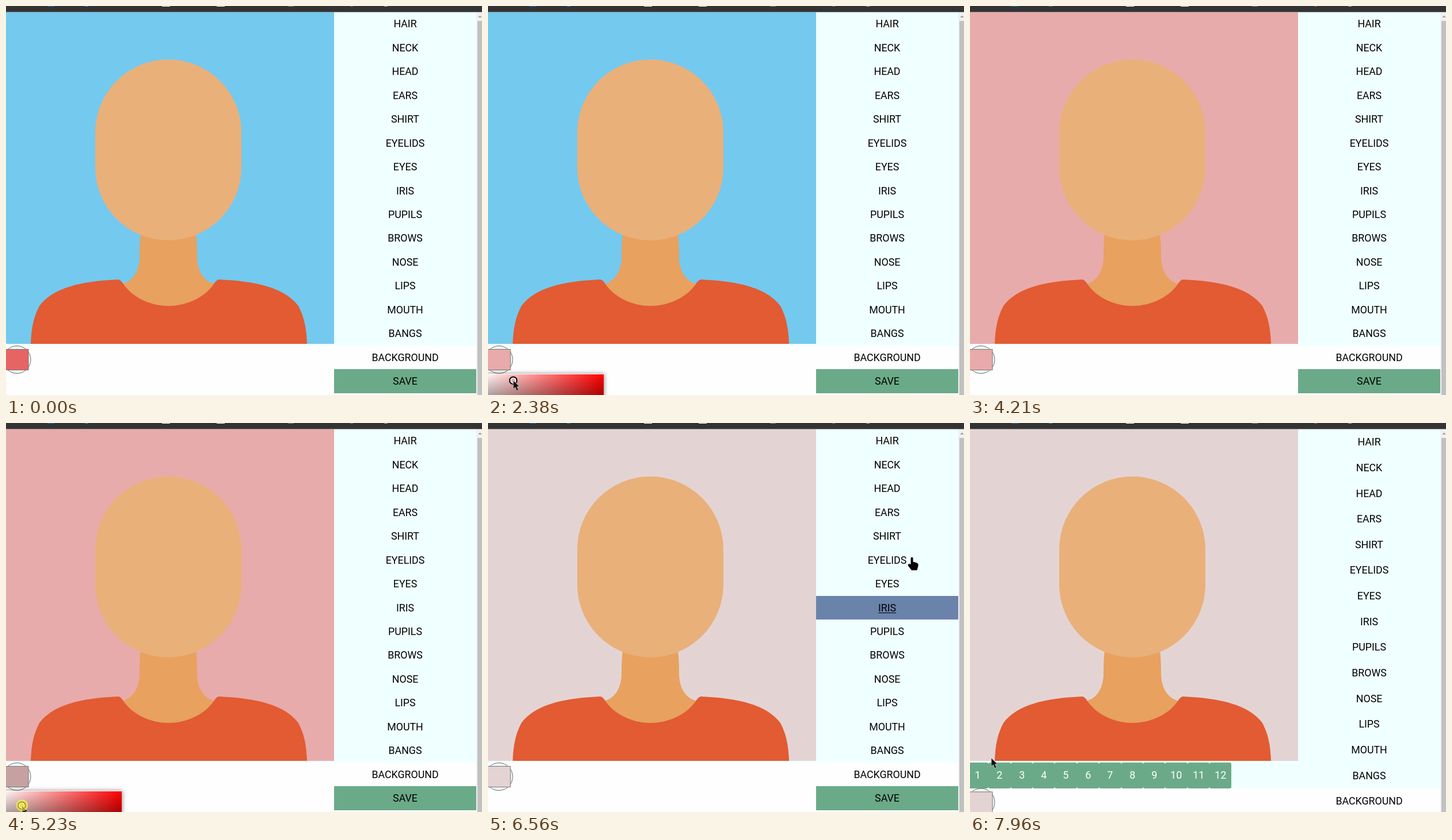
An HTML page with a canvas for the animation above (7990 ms loop, 827 px wide and 677 px high).

```html
<!DOCTYPE html>
<html lang="en">
<head>
<meta charset="utf-8">
<title>Avatar editor</title>
<style>
  html, body { margin: 0; width: 100%; height: 100%; overflow: hidden; background: #fefefe; }
  canvas { display: block; }
</style>
</head>
<body>
<canvas id="stage" width="827" height="677"></canvas>
<script>
const ctx = document.getElementById('stage').getContext('2d');
const LOOP = 7990;
const MENU = ['HAIR', 'NECK', 'HEAD', 'EARS', 'SHIRT', 'EYELIDS', 'EYES', 'IRIS', 'PUPILS',
  'BROWS', 'NOSE', 'LIPS', 'MOUTH', 'BANGS', 'BACKGROUND', 'SAVE'];
const GREEN = '#6baa88', AZURE = '#f0ffff';
const PANEL = { left: 570, right: 817, top: 10.7, step: 41.45 };
const PICKER = { left: -13, top: 642, width: 214, height: 108 };

// Places the pointer visits
const tone = (saturation, value) =>
  [PICKER.left + saturation * PICKER.width, PICKER.top + (1 - value) * PICKER.height];
const item = name => [750, PANEL.top + (MENU.indexOf(name) + .5) * PANEL.step];
const RED = tone(.565, .9), PINK = tone(.266, .91), DUSTY = tone(.19, .78), PALE = tone(.07, .89);
const SWATCH = [20, 623], BLANK = [301, 620], BELOW = [311, 640];
const OFF_BOTTOM = [400, 720], OFF_LEFT = [-30, 530], SHOULDER = [37, 583];

const MOVES = [
  { from: 100, to: 270, goal: SWATCH },
  { from: 1170, to: 1900, goal: RED },
  { from: 2050, to: 2300, goal: PINK, picks: true },
  { from: 2620, to: 2860, goal: BLANK },
  { from: 3460, to: 3880, goal: item('SHIRT') },
  { from: 3880, to: 4210, goal: OFF_LEFT },
  { from: 4300, to: 4460, goal: SWATCH },
  { from: 4880, to: 5100, goal: PINK },
  { from: 5150, to: 5230, goal: DUSTY, picks: true },
  { from: 5230, to: 5400, goal: PALE, picks: true },
  { from: 5560, to: 5780, goal: BELOW },
  { from: 6150, to: 6640, goal: item('EARS') },
  { from: 6840, to: 6960, goal: item('HAIR') },
  { from: 7540, to: 7960, goal: SHOULDER }
];
const PICKS = MOVES.filter(move => move.picks);

// Clicks open and close the picker in turn; the last one opens the hair tools.
const CLICKS = [430, 2880, 4540, 5820, 7030];
const CLICK_TIME = 130, PICKER_DELAY = 250, TOOLS_DELAY = 100, HOVER_LAG = 70;
const BACKGROUNDS = ['#74c9ef', '#e8abab', '#e3d4d3'];

// Sideways motion eases out while vertical motion stays even, which bends each path.
function follow(moves, start, t) {
  let [x, y] = start;
  for (const { from, to, goal } of moves) {
    if (t < from) break;
    const k = Math.min(1, (t - from) / (to - from));
    x += (goal[0] - x) * Math.sin(k * Math.PI / 2);
    y += (goal[1] - y) * k;
  }
  return [x, y];
}

function box(x, y, w, h, color) {
  ctx.fillStyle = color;
  ctx.fillRect(x, y, w, h);
}

function rounded(x, y, w, h, r, color) {
  ctx.beginPath();
  ctx.roundRect(x, y, w, h, r);
  ctx.fillStyle = color;
  ctx.fill();
}

function shape(d, fill, stroke, x = 0, y = 0) {
  const path = new Path2D(d);
  ctx.save();
  ctx.translate(x, y);
  ctx.fillStyle = fill;
  ctx.fill(path);
  if (stroke) {
    ctx.strokeStyle = stroke;
    ctx.lineWidth = 1;
    ctx.stroke(path);
  }
  ctx.restore();
}

function disc(x, y, r, fill, stroke, width = 1) {
  ctx.beginPath();
  ctx.arc(x, y, r, 0, Math.PI * 2);
  ctx.fillStyle = fill;
  ctx.fill();
  if (stroke) {
    ctx.strokeStyle = stroke;
    ctx.lineWidth = width;
    ctx.stroke();
  }
}

function label(text, x, middle, size, color) {
  ctx.font = `${size}px Roboto, sans-serif`;
  ctx.textAlign = 'center';
  ctx.fillStyle = color;
  ctx.fillText(text, x, Math.round(middle + size * .333));
}

function drawPortrait(background) {
  box(0, 11, PANEL.left, 577, background);
  shape('M234 395C232 415 232 425 232 440C230 468 216 480 202 484L225 530H340L363 484' +
    'C348 480 334 468 332 440C332 425 332 415 330 395Z', '#e8a15f');
  rounded(155, 93, 254, 315, 127, '#eab07a');
  shape('M43 588C44 560 48 541 58 522C82 490 130 479 195 476Q199 476 204 484' +
    'C222 510 255 522 282 522C310 522 343 510 361 484Q366 476 370 476' +
    'C435 479 484 490 508 522C518 541 522 560 523 588Z', '#e25b32');
}

function drawBrowser() {
  box(0, 0, 827, 10.6, '#333');
  box(72, 0, 12, 1, '#1279b8');
  box(137, 0, 6, 1, '#1c8fd6');
  box(271, 0, 14, 1, '#fff');
  box(366, 0, 14, 1, '#fff');
  box(490, 0, 10, 1, '#888');
  box(598, 0, 5, 1, '#d0593a');
  box(657, 0, 6, 1, '#aaa');
  box(PANEL.right, 11, 10, 666, '#f1f1f1');
  box(819, 26, 8, 651, '#c1c1c1');
  shape('M820 20L823.5 16.5L827 20Z', '#a3a3a3');
}

function drawMenu(hovered, top, step) {
  const width = PANEL.right - PANEL.left, center = PANEL.left + width / 2;
  MENU.forEach((name, i) => {
    const y = Math.round(top + i * step), height = Math.round(top + (i + 1) * step) - y;
    const middle = top + (i + .5) * step;
    if (name === 'SAVE') box(PANEL.left, y, width, height, GREEN);
    if (i === hovered) box(PANEL.left, y, width, height, '#6a83ab');
    label(name, center, middle, 17.8, '#000');
    if (i === hovered) {
      const line = ctx.measureText(name).width;
      box(center - line / 2, Math.round(middle + 8), line, 1, '#000');
    }
  });
}

function drawTools() {
  const edge = i => Math.round(-6.3 + i * 38.4);
  for (let i = 0; i < 12; i++) {
    rounded(edge(i), 591, edge(i + 1) - edge(i), 45, 3, GREEN);
    label(i + 1, edge(i) + 19.2, 613.5, 18, '#fff');
  }
}

function drawSwatch(color, shift) {
  disc(19, 615.5 + shift, 24, '#f1f6f6', '#6b6b6b');
  box(-5, 597 + shift, 44, 37, color);
  ctx.strokeStyle = '#777';
  ctx.strokeRect(-5.5, 597.5 + shift, 44.5, 36);
}

function drawPicker([x, y], color) {
  const { left, top, width, height } = PICKER;
  const fade = (x1, y1, from, to) => {
    const gradient = ctx.createLinearGradient(left, top, x1, y1);
    gradient.addColorStop(0, from);
    gradient.addColorStop(1, to);
    box(left, 641, width, height, gradient);
  };
  ctx.save();
  ctx.shadowColor = 'rgba(0,0,0,.45)';
  ctx.shadowBlur = 7;
  ctx.shadowOffsetX = 1;
  box(left, 640, width, height, '#fff');
  ctx.restore();
  fade(left + width, top, '#fff', '#f00');
  fade(left, top + height, 'rgba(0,0,0,0)', '#000');
  disc(x, y, 6.3, '#fff', '#000', 2);
  disc(x, y, 3.6, color);
}

function drawPointer([x, y], hand, pressed) {
  if (hand) shape('M-1 1Q0-1 2 1V8L9 10Q12 11 11 15L9 22H0L-6 14Q-6 11-3 12L-1 13Z', '#0a0404', '#0a0404', x, y);
  else shape('M0 0V15L3.4 11.8L6 18L9 16.7L6.4 10.8H11Z', '#111', 'rgba(225,225,225,.7)', x, y);
  if (pressed) disc(x + .5, y, 10.5, 'rgba(255,250,60,.62)');
}

function pickedColor([x, y]) {
  const saturation = (x - PICKER.left) / PICKER.width;
  const value = 255 * (1 - (y - PICKER.top) / PICKER.height);
  const low = value * (1 - saturation);
  return `rgb(${value}, ${low}, ${low})`;
}

function draw(t) {
  const clicks = CLICKS.filter(time => t >= time).length;
  const sinceClick = clicks ? t - CLICKS[clicks - 1] : Infinity;
  const tools = clicks === CLICKS.length && sinceClick >= TOOLS_DELAY;
  const pickerOpen = clicks % 2 === 1 && clicks < CLICKS.length && sinceClick >= PICKER_DELAY;
  const picking = PICKS.some(({ from, to }) => t >= from && t < to + 50);

  const top = tools ? 11 : PANEL.top, step = tools ? 44.64 : PANEL.step;
  const handle = follow(PICKS, RED, t), color = pickedColor(handle);
  const pointer = follow(MOVES, OFF_BOTTOM, t), lagging = follow(MOVES, OFF_BOTTOM, t - HOVER_LAG);
  const inMenu = ([x, y]) => x > PANEL.left && x < PANEL.right && y > top;
  const hovered = inMenu(lagging) ? Math.floor((lagging[1] - top) / step) : -1;

  box(0, 0, 827, 677, '#fefefe');
  box(0, 11, PANEL.right, tools ? 625 : 580, AZURE);
  drawPortrait(BACKGROUNDS[Math.min(2, clicks >> 1)]);
  drawMenu(hovered, top, step);
  drawBrowser();
  if (tools) drawTools();
  drawSwatch(color, tools ? 44.5 : 0);
  if (pickerOpen) drawPicker(handle, color);
  drawPointer(pointer, inMenu(pointer), picking || sinceClick < CLICK_TIME);
}

function tick() {
  draw(performance.now() % LOOP);
  requestAnimationFrame(tick);
}
tick();
</script>
</body>
</html>
```
